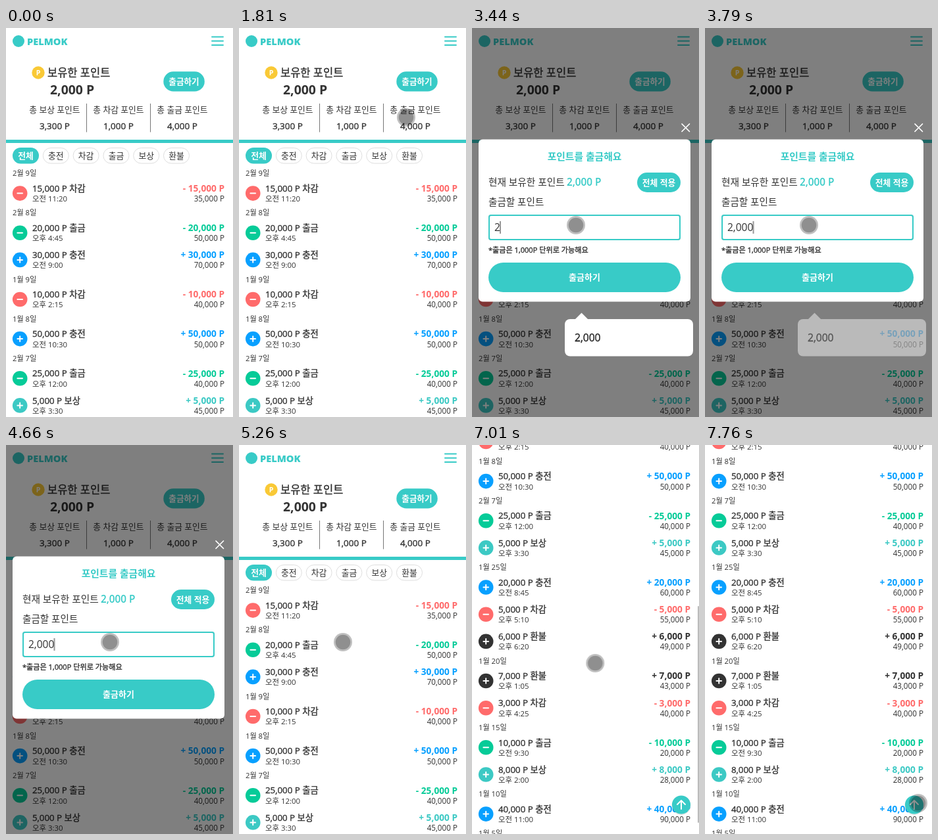
Write an HTML page that moves like this. It is 345 px wide and 592 px high and loops after 8 s.

```html
<!DOCTYPE html>
<html lang="ko">
<head>
<meta charset="utf-8">
<title>포인트 출금</title>
<style>
  html, body { margin: 0; width: 100%; height: 100%; overflow: hidden; background: #fff; }
  svg { display: block; width: 345px; height: 592px; }
  text {
    font-family: "Open Sans", "Noto Sans CJK KR", "Noto Sans CJK", sans-serif;
    fill: #333; white-space: pre;
  }
  .mid { text-anchor: middle; }
  .end { text-anchor: end; }
  .ln { fill: none; stroke-linecap: round; stroke-linejoin: round; }

  #page, #modal, #popup, #values, #caret, #focus, #top, #bar, #cursor {
    animation: 8s linear infinite;
  }
  #page { animation-name: scroll; animation-timing-function: step-end; }
  #top { animation-name: top; animation-timing-function: step-end; }
  #bar { animation-name: bar; }
  #modal { animation-name: modal; }
  #popup { animation-name: popup; }
  #values { animation-name: values; animation-timing-function: step-end; }
  #caret { animation-name: caret; animation-timing-function: step-end; }
  #focus { animation-name: focus; animation-timing-function: step-end; }
  #cursor { animation-name: cursor; }

  @keyframes scroll {
    0% { transform: translateY(0); }
    79.95% { transform: translateY(-233px); }
    80.85% { transform: translateY(-372px); }
    81.7%, 100% { transform: translateY(-418px); }
  }
  @keyframes top {
    0% { opacity: 0; }
    79.95%, 100% { opacity: 1; }
  }
  @keyframes bar {
    0%, 79.94% { opacity: 0; transform: translateY(155px); }
    79.95%, 80.8% { opacity: 1; transform: translateY(155px); }
    81.7%, 87.5% { opacity: 1; transform: translateY(245px); }
    90%, 100% { opacity: 0; transform: translateY(245px); }
  }
  @keyframes modal {
    0%, 23.3% { opacity: 0; }
    25.8%, 64.5% { opacity: 1; }
    65.7%, 100% { opacity: 0; }
  }
  @keyframes popup {
    0%, 41.2% { opacity: 0; }
    42.4%, 44.6% { opacity: 1; }
    49.8%, 100% { opacity: 0; }
  }
  @keyframes values {
    0% { transform: translateY(0); }
    41.3% { transform: translateY(-40px); }
    43.85% { transform: translateY(-80px); }
    44.7% { transform: translateY(-120px); }
    45.6%, 100% { transform: translateY(-160px); }
  }
  @keyframes caret {
    0% { opacity: 0; transform: translateX(43px); }
    36.2% { opacity: 1; transform: translateX(43px); }
    43.85% { opacity: 1; transform: translateX(52px); }
    44.7% { opacity: 1; transform: translateX(61px); }
    45.6% { opacity: 1; transform: translateX(73.5px); }
    51.9% { opacity: 0; transform: translateX(73.5px); }
    58.2% { opacity: 1; transform: translateX(73.5px); }
    64.85%, 100% { opacity: 0; transform: translateX(73.5px); }
  }
  @keyframes focus {
    0% { opacity: 0; }
    36.2%, 100% { opacity: 1; }
  }
  @keyframes cursor {
    0%, 8.3% { transform: translate(362px, 186px); }
    11.6%, 14% { transform: translate(256px, 96px); }
    14.85%, 18.9% { transform: translate(256px, 92px); }
    19%, 20.4% { transform: translate(254px, 90px); }
    22.6%, 23.4% { transform: translate(254px, 136px); }
    25.2% { transform: translate(238px, 178px); }
    27% { transform: translate(205px, 218px); }
    28.8% { transform: translate(176px, 260px); }
    30.3%, 31.9% { transform: translate(158px, 298px); }
    32.8%, 36.2% { transform: translate(157px, 297px); }
    37%, 75.3% { transform: translate(158px, 300px); }
    76.7%, 87.2% { transform: translate(173px, 309px); }
    89.5% { transform: translate(248px, 430px); }
    92%, 94.3% { transform: translate(322px, 545px); }
    94.5%, 96.9% { transform: translate(324px, 539px); }
    97%, 100% { transform: translate(324px, 545px); }
  }
</style>
</head>
<body>
<svg id="stage" viewBox="0 0 345 592"></svg>
<script>
  const TEAL = '#38cbc7';
  const KINDS = {
    차감: ['-', '#ff6b6b'],
    출금: ['-', '#06cb98'],
    충전: ['+', '#08a0ff'],
    보상: ['+', '#3cc9c4'],
    환불: ['+', '#333']
  };
  // day: [amount, kind, time, balance]
  const DAYS = [
    ['2월 9일', ['15,000', '차감', '오전 11:20', '35,000']],
    ['2월 8일', ['20,000', '출금', '오후 4:45', '50,000'], ['30,000', '충전', '오전 9:00', '70,000']],
    ['1월 9일', ['10,000', '차감', '오후 2:15', '40,000']],
    ['1월 8일', ['50,000', '충전', '오전 10:30', '50,000']],
    ['2월 7일', ['25,000', '출금', '오후 12:00', '40,000'], ['5,000', '보상', '오후 3:30', '45,000']],
    ['1월 25일', ['20,000', '충전', '오전 8:45', '60,000'], ['5,000', '차감', '오후 5:10', '55,000'],
      ['6,000', '환불', '오후 6:20', '49,000']],
    ['1월 20일', ['7,000', '환불', '오후 1:05', '43,000'], ['3,000', '차감', '오후 4:25', '40,000']],
    ['1월 15일', ['10,000', '출금', '오전 9:30', '20,000'], ['8,000', '보상', '오후 2:00', '28,000']],
    ['1월 10일', ['40,000', '충전', '오전 11:00', '90,000']],
    ['1월 5일']
  ];

  // Medium weight is regular text with a hairline outline.
  const text = (s, x, y, size, weight = 400, fill = '#333', cls = '') => {
    const medium = weight === 500 ? `;stroke:${fill};stroke-width:.35px` : '';
    return `<text x="${x}" y="${y}" class="${cls}" style="font-size:${size}px;` +
      `font-weight:${medium ? 400 : weight};fill:${fill}${medium}">${s}</text>`;
  };
  const mid = (s, x, y, size, weight, fill) => text(s, x, y, size, weight, fill, 'mid');
  const end = (s, x, y, size, weight, fill) => text(s, x, y, size, weight, fill, 'end');
  const box = (x, y, w, h, r, fill, extra = '') =>
    `<rect x="${x}" y="${y}" width="${w}" height="${h}" rx="${r}" fill="${fill}" ${extra}/>`;
  const dot = (x, y, r, fill, extra = '') => `<circle cx="${x}" cy="${y}" r="${r}" fill="${fill}" ${extra}/>`;
  const line = (d, color, w) => `<path class="ln" d="${d}" stroke="${color}" stroke-width="${w}"/>`;

  function header() {
    const stats = [['보상', '3,300'], ['차감', '1,000'], ['출금', '4,000']];
    return dot(19, 20, 9, TEAL) + text('PELMOK', 32, 25.5, 14.6, 800, TEAL) +
      line('M313 13.5H330M313 19.8H330M313 26H330', TEAL, 1.9) +
      dot(49, 68, 9.7, '#f9c936') + mid('P', 49, 72, 10.5, 700, '#fff') +
      text('보유한 포인트', 63, 73.8, 16.5, 500) +
      text('2,000 P', 67, 101, 19.4, 700) +
      box(239.3, 66.3, 62.5, 30.2, 15.1, TEAL) + mid('출금하기', 270.5, 86.3, 12.6, 700, '#fff') +
      stats.map(([name, sum], i) =>
        mid(`총 ${name} 포인트`, 74 + 97 * i, 128.6, 12.8) +
        mid(`${sum} P`, 74 + 97 * i, 154, 13.5, 500)).join('') +
      box(122, 115, 1, 43.5, 0, '#777') + box(219, 115, 1, 43.5, 0, '#777') +
      box(0, 170, 345, 5, 0, TEAL);
  }

  function tabs() {
    return ['전체', '충전', '차감', '출금', '보상', '환불'].map((name, i) => {
      const x = 10 + 45.8 * i, on = i === 0;
      return (on ? box(x, 182, 40, 24.5, 12.2, TEAL)
        : box(x + .5, 182.5, 39, 23.5, 11.7, '#fff', 'stroke="#ddd"')) +
        mid(name, x + 20, 199.2, 12.8, on ? 700 : 400, on ? '#fff' : '#333');
    }).join('');
  }

  function entry([sum, kind, time, left], y) {
    const [sign, color] = KINDS[kind], cx = 21.2, cy = y + 7.6;
    return dot(cx, cy, 11.3, color) +
      line(`M${cx - 3.8} ${cy}h7.6` + (sign === '+' ? `M${cx} ${cy - 3.8}v7.6` : ''), '#fff', 2) +
      text(`${sum} P ${kind}`, 40, y + 4.8, 13.3, 500) +
      text(time, 40, y + 20, 11.4) +
      end(`${sign} ${sum} P`, 332, y + 4.9, 13.7, 700, color) +
      end(`${left} P`, 332, y + 20, 11.7);
  }

  function list() {
    let y = 221, out = '';
    for (const [date, ...rows] of DAYS) {
      out += text(date, 10, y + 4.2, 11.2);
      rows.forEach((row, i) => out += entry(row, y + 23 + 41.2 * i));
      y += 60.1 + 41.2 * (rows.length - 1);
    }
    return out;
  }

  function modal() {
    const values = ['0', '2', '20', '200', '2,000'];
    return box(0, 0, 345, 592, 0, '#000', 'opacity=".5"') +
      line('M319 146L330.5 157.5M330.5 146L319 157.5', '#fff', 1.7) +
      box(10, 169.5, 322, 247, 6, '#fff') +
      mid('포인트를 출금해요', 171, 200.8, 14.8, 700, TEAL) +
      text('현재 보유한 포인트', 25, 239.8, 14.7) +
      text('2,000 P', 144, 240, 15.3, 600, TEAL) +
      box(251, 220, 66, 30, 15, TEAL) + mid('전체 적용', 284, 239.6, 12.8, 700, '#fff') +
      text('출금할 포인트', 25, 269.8, 14.6) +
      box(25.5, 284.5, 291, 38, 3, '#fff', 'stroke="#bbb"') +
      `<g id="focus">${box(26, 285, 290, 37, 3, '#fff', `stroke="${TEAL}" stroke-width="2"`)}</g>` +
      `<g clip-path="url(#field)"><g id="values">` +
      values.map((v, i) => text(v, 34, 309 + 40 * i, 15.5)).join('') + '</g></g>' +
      `<g id="caret">${box(-.5, 294, 1, 19, 0, '#333')}</g>` +
      text('*출금은 1,000P 단위로 가능해요', 25, 342, 11.1, 500) +
      box(25, 357, 292, 45, 22.5, TEAL) + mid('출금하기', 171, 384.2, 13, 700, '#fff') +
      `<g id="popup">${box(141, 443, 195, 56.5, 8, '#fff')}` +
      '<path d="M156.5 443.5L166.5 433.5L176.5 443.5Z" fill="#fff"/>' +
      text('2,000', 156, 476.8, 15.6, 500, '#222') + '</g>';
  }

  document.getElementById('stage').innerHTML =
    '<defs><clipPath id="field"><rect x="27" y="288" width="288" height="32"/></clipPath></defs>' +
    box(0, 0, 345, 592, 0, '#fff') +
    `<g id="page">${header() + tabs() + list()}</g>` +
    `<g id="top">${dot(318, 548.5, 14.5, '#000', 'opacity=".1"') + dot(318, 547.5, 14, TEAL) +
      line('M318 554V541.5M312 547L318 541L324 547', '#fff', 2)}</g>` +
    `<g id="bar">${box(343, 0, 2, 330, 1, '#b8b8b8')}</g>` +
    `<g id="modal">${modal()}</g>` +
    `<g id="cursor">${dot(0, 0, 14, '#000', 'opacity=".25"') + dot(0, 0, 11.3, '#000', 'opacity=".25"')}</g>`;
</script>
</body>
</html>
```
